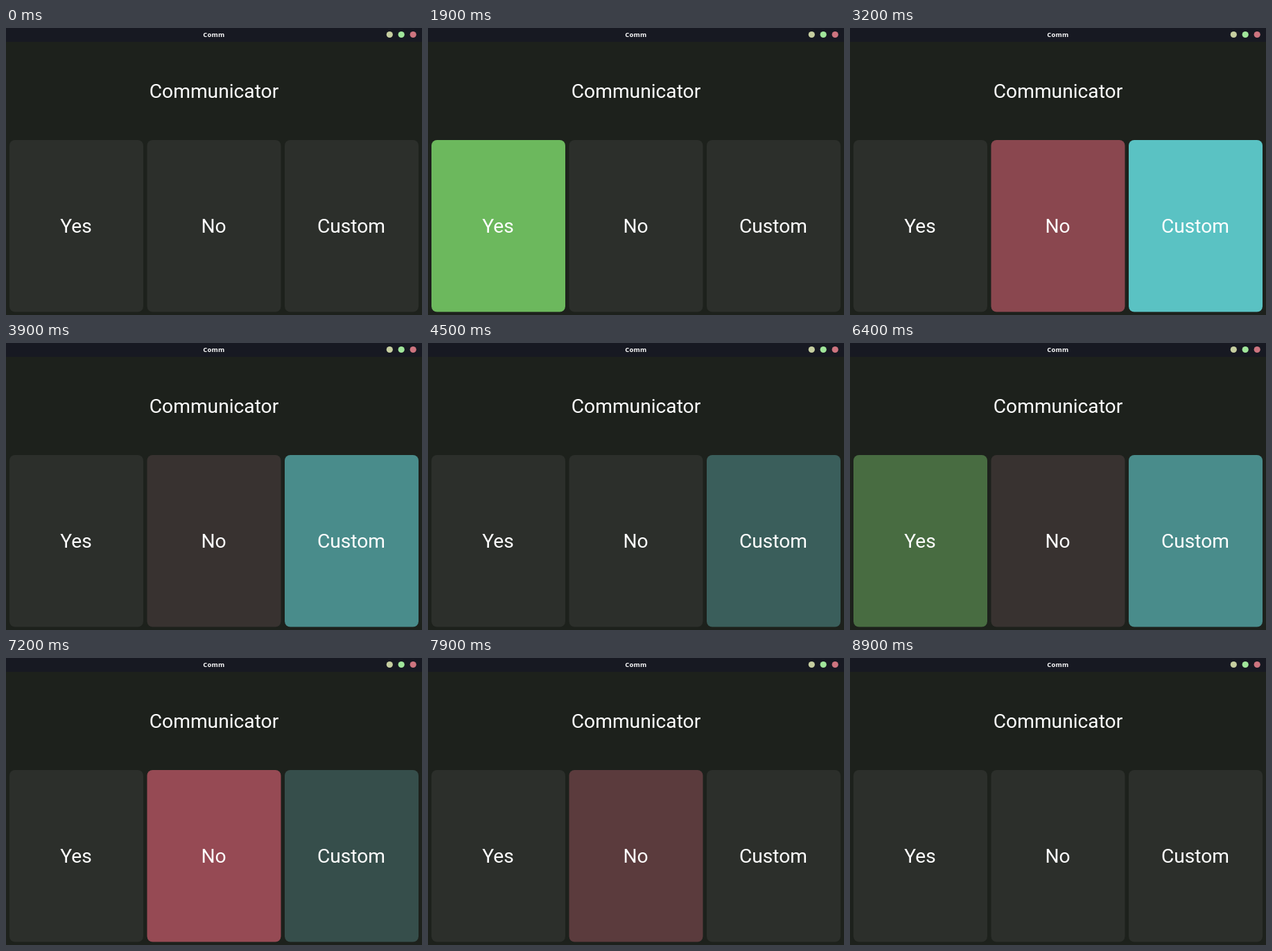
Write an HTML page that moves like this. It is 600 px wide and 415 px high and loops after 9200 ms.

```html
<!DOCTYPE html>
<html lang="en">
<head>
<meta charset="utf-8">
<title>Comm</title>
<style>
  html, body { margin: 0; width: 100%; height: 100%; overflow: hidden; background: #1d211c; }
  svg { display: block; }
  text { fill: #fff; text-anchor: middle; font: 28.2px Roboto, sans-serif; }
  .caption { font: bold 9.4px "Open Sans", "Noto Sans", sans-serif; letter-spacing: 0.2px; }
</style>
</head>
<body>
<svg id="stage" width="600" height="415" viewBox="0 0 600 415">
  <rect width="600" height="415" fill="#1d211c"/>
  <rect width="600" height="20" fill="#171922"/>
  <text class="caption" x="299.8" y="13.2">Comm</text>
  <circle cx="553.3" cy="9.5" r="4.6" fill="#c6cea0"/>
  <circle cx="570.2" cy="9.5" r="4.6" fill="#a0e59a"/>
  <circle cx="587.2" cy="9.5" r="4.6" fill="#cd747f"/>
  <text x="300" y="100.8">Communicator</text>
</svg>
<script>
const LOOP = 9200, STEP = 100, RISE = 1000;
const IDLE = [44, 47, 43];

// Each press lights a button up over RISE ms, then lets it fade.
const buttons = [
  { label: 'Yes', color: [115, 199, 98], presses: [1000, 4800], fade: 1000 },
  { label: 'No', color: [162, 77, 88], presses: [2000, 6300], fade: 1000 },
  { label: 'Custom', color: [92, 202, 203], presses: [2100, 4600], fade: 2000 }
];

const stage = document.getElementById('stage');

function add(tag, attributes) {
  const node = document.createElementNS('http://www.w3.org/2000/svg', tag);
  for (const name in attributes) node.setAttribute(name, attributes[name]);
  return stage.appendChild(node);
}

buttons.forEach((button, i) => {
  const x = 5 + 198.5 * i;
  button.rect = add('rect', { x, y: 162, width: 193, height: 248.5, rx: 8 });
  add('text', { x: x + 96, y: 296.3 }).textContent = button.label;
});

const pulse = (age, fade) => Math.max(0, Math.min(age / RISE, 1 - (age - RISE) / fade));

function draw(elapsed) {
  const t = Math.floor(elapsed % LOOP / STEP) * STEP;
  for (const { rect, color, presses, fade } of buttons) {
    const level = Math.max(...presses.map(start => pulse(t - start, fade)));
    const rgb = IDLE.map((c, i) => Math.round(c + (color[i] - c) * level));
    rect.setAttribute('fill', `rgb(${rgb})`);
  }
}

const start = performance.now();
function tick() {
  draw(performance.now() - start);
  requestAnimationFrame(tick);
}
tick();
</script>
</body>
</html>
```
